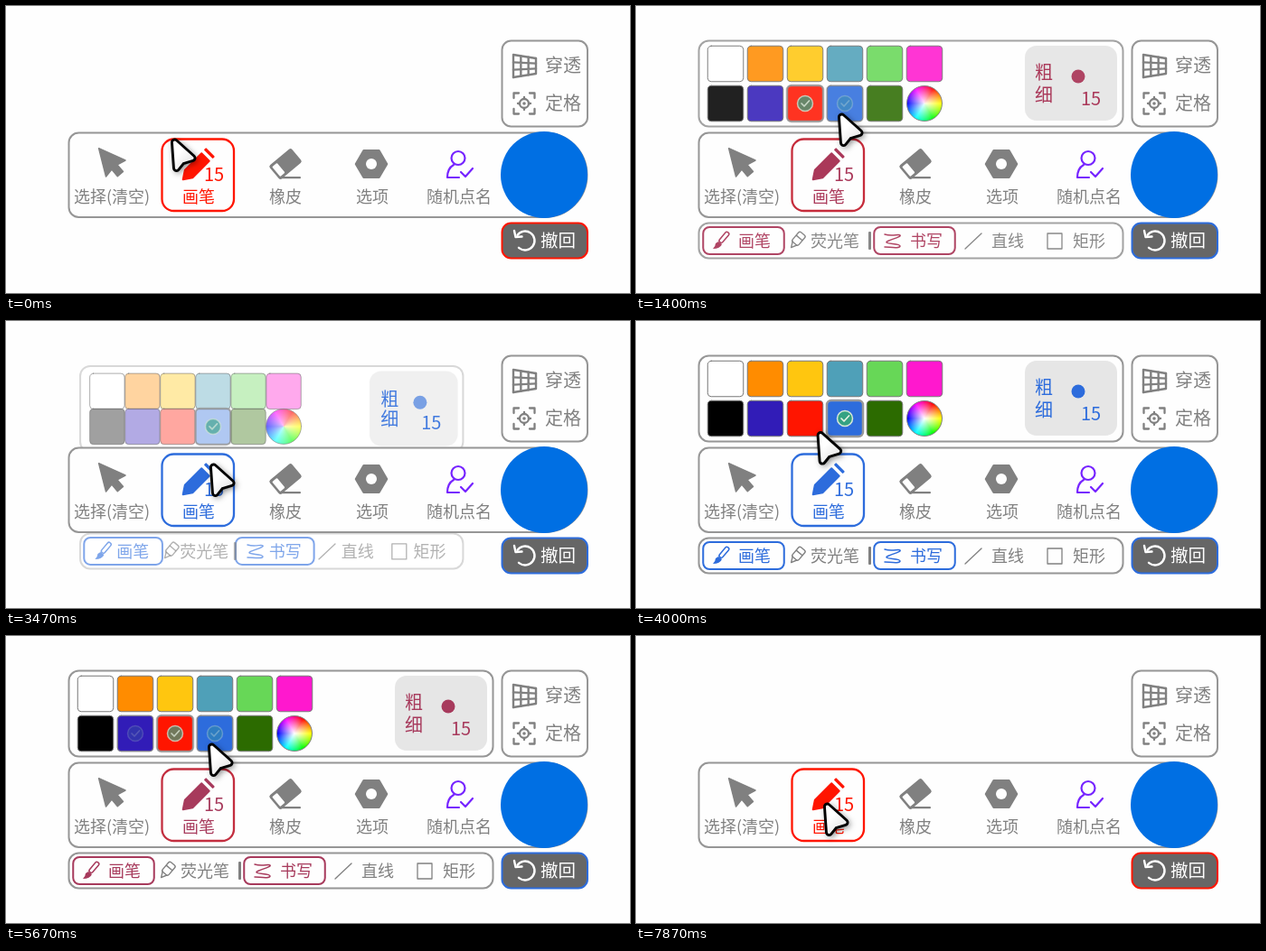
Animation of 690x318 px, one loop 9.67 s. Source, as an HTML page with a canvas:

```html
<!DOCTYPE html>
<html lang="zh-CN">
<head>
<meta charset="utf-8">
<title>画笔工具栏</title>
<style>
html, body { margin: 0; width: 100%; height: 100%; overflow: hidden; background: #fefefe; }
canvas { display: block; width: 690px; height: 318px; }
</style>
</head>
<body>
<canvas id="stage" width="690" height="318"></canvas>
<script>
const ctx = document.getElementById('stage').getContext('2d');
const LOOP = 9670, TOGGLE_MS = 420, TINT_MS = 300, GLIDE_MS = 220;
const GRAY = '#808080', LINE = '#969696', PAPER = '#fefefe';
const FONT = '"Noto Sans CJK SC", "Noto Sans CJK", "Noto Sans", sans-serif';

// Places the pointer visits; some pick a colour, the pen button toggles the panel
const RED = { x: 187, y: 104, rgb: [255, 21, 0] };
const BLUE = { x: 223, y: 118, rgb: [45, 108, 220] };
const PURPLE = { x: 149, y: 104, rgb: [49, 28, 183] };
const PEN = { x: 207, y: 184, toggles: true };
const START = { x: 182, y: 146 }, REST = { x: 204, y: 186 }, HOVER = { x: 225, y: 157 };

// Arrival time, place, travel time
const STEPS = [
  [0, START], [400, REST, 330], [1035, PEN], [1280, BLUE], [2300, PEN], [3315, PEN],
  [3470, HOVER], [4310, RED, 800], [4605, PURPLE], [5180, RED], [5545, BLUE],
  [6680, RED], [7190, PEN]
].map(([at, spot, travel = GLIDE_MS]) => ({ at, spot, travel }));
const PICKS = [{ at: 0, spot: RED }, ...STEPS.filter(s => s.spot.rgb)];
const TOGGLES = STEPS.filter(s => s.spot.toggles);

const SWATCHES = [
  ['#ffffff', '#ff8c00', '#ffc60f', '#4fa0b8', '#67d757', '#ff18ce'],
  ['#000000', PURPLE, RED, BLUE, '#2c6b00', null]
];

const clamp = v => Math.max(0, Math.min(1, v));
const mix = (a, b, k) => a + (b - a) * k;
const css = c => `rgb(${c.map(Math.round)})`;
const lastBefore = (list, t) => list.findLastIndex(s => s.at <= t);

function penColor(t) {
  const i = Math.max(0, lastBefore(PICKS, t));
  const to = PICKS[i].spot.rgb, from = PICKS[Math.max(0, i - 1)].spot.rgb;
  return css(to.map((v, n) => mix(from[n], v, clamp((t - PICKS[i].at) / TINT_MS))));
}

function checkLevel(spot, t) {
  let level = spot === RED ? 1 : 0;
  PICKS.forEach((pick, i) => {
    const end = Math.min(t, PICKS[i + 1]?.at ?? t);
    const span = Math.max(0, end - pick.at);
    level = clamp(level + (pick.spot === spot ? span / 400 : -span / 600));
  });
  return level;
}

function panelState(t) {
  const i = lastBefore(TOGGLES, t);
  if (i < 0) return { geo: 0, alpha: 0 };
  const u = clamp((t - TOGGLES[i].at) / TOGGLE_MS), rest = (1 - u) ** 4.7;
  return i % 2 ? { geo: rest, alpha: 1 - u } : { geo: 1 - rest, alpha: u };
}

function pointerAt(t) {
  const i = lastBefore(STEPS, t), { at, spot } = STEPS[i], next = STEPS[i + 1];
  if (!next) return spot;
  const u = clamp(1 - (next.at - t) / Math.min(next.travel, next.at - at));
  const k = u * u * (3 - 2 * u);
  return { x: mix(spot.x, next.spot.x, k), y: mix(spot.y, next.spot.y, k) };
}

function paint(fill, stroke, width) {
  if (fill) { ctx.fillStyle = fill; ctx.fill(); }
  if (stroke) { ctx.strokeStyle = stroke; ctx.lineWidth = width; ctx.stroke(); }
}

function box(x, y, w, h, r, fill, stroke, width = 2) {
  ctx.beginPath();
  ctx.roundRect(x, y, w, h, r);
  paint(fill, stroke, width);
}

function disc(x, y, r, fill, stroke, width) {
  ctx.beginPath();
  ctx.arc(x, y, r, 0, 7);
  paint(fill, stroke, width);
}

function shape(path, fill, stroke, width = 2) {
  const p = new Path2D(path);
  if (fill) { ctx.fillStyle = fill; ctx.fill(p); }
  if (stroke) { ctx.strokeStyle = stroke; ctx.lineWidth = width; ctx.stroke(p); }
}

function label(text, x, y, size, color) {
  ctx.font = `${size}px ${FONT}`;
  ctx.fillStyle = color;
  ctx.fillText(text, x, y + size * 0.37);
}

function within(x, y, degrees, draw) {
  ctx.save();
  ctx.translate(x, y);
  ctx.rotate(degrees * Math.PI / 180);
  draw();
  ctx.restore();
}

// Panel parts fly out of the pen button; they keep most of their size.
const place = (x, y, originY, geo, draw) =>
  within(mix(213, x, geo), mix(originY, y, geo), 0, draw);

function centered(w, h, r, geo, ...style) {
  const pw = mix(Math.min(w * 0.75, 64), w, geo);
  box(-pw / 2, -h / 2, pw, h, r, ...style);
}

function colorWheel() {
  const hues = ctx.createConicGradient(-Math.PI / 3, 0, 0);
  for (let i = 0; i <= 6; i++) hues.addColorStop(i / 6, `hsl(${i * 60} 100% 50%)`);
  disc(0, 0, 19.5, hues);
  const glow = ctx.createRadialGradient(0, 0, 0, 0, 0, 19);
  glow.addColorStop(0, '#fff');
  glow.addColorStop(1, 'rgba(255,255,255,0)');
  disc(0, 0, 19.5, glow, GRAY, 1);
}

function swatch(color, geo, alpha, ink, t) {
  if (color) {
    ctx.globalAlpha = alpha;
    centered(39.5, 39.5, 4, geo, color.rgb ? css(color.rgb) : color);
  }
  ctx.globalAlpha = ink;
  if (!color) return colorWheel();
  centered(39.5, 39.5, 4, geo, null, '#777', 1);
  const level = color.rgb ? checkLevel(color, t) : 0;
  if (!level) return;
  ctx.globalAlpha = ink * level;
  centered(40, 40, 5, geo, null, '#999', 2.5);
  disc(0, 0, 8.5, '#35a282', '#d8e8d8', 1.5);
  shape('M-4 0L-1 3L4.5-3', null, '#e8f2e4', 1.7);
}

function drawPalette(t, pen, { geo, alpha }) {
  const put = (x, y, draw) => place(x, y, 187, geo, draw);
  const ink = Math.sqrt(alpha);
  ctx.globalAlpha = alpha;
  put(304, 86, () => centered(469, 95, 11, geo, PAPER, LINE));
  SWATCHES.forEach((row, j) => row.forEach((color, i) =>
    put(99 + 44 * i, 64 + 44 * j, () => swatch(color, geo, alpha, ink, t))));
  ctx.globalAlpha = ink;
  put(481, 85.5, () => centered(102, 83, 13, geo, '#e6e6e6'));
  put(489, 78, () => disc(0, 0, 7.5, pen));
  ctx.globalAlpha = Math.min(1, alpha * 2.4);
  put(451, 74, () => label('粗', 0, 0, 20, pen));
  put(451, 99, () => label('细', 0, 0, 20, pen));
  put(503, 103, () => label('15', 0, 0, 20, pen));
}

function drawModes(pen, { geo, alpha }) {
  const put = (x, draw) => place(x, 260, 215, geo, draw);
  ctx.globalAlpha = alpha;
  put(304, () => centered(469, 39, 11, geo, PAPER, LINE));
  ctx.globalAlpha = Math.sqrt(alpha);
  for (const x of [119, 308]) put(x, () => centered(89.5, 30, 7, geo, null, pen));
  put(94, () => {
    within(0, 0, -50, () => box(-2, -2, 14, 4.5, 2, null, pen, 1.5));
    shape('M-3 1L1 4Q-1 9-9 9Q-6 6-6 3Z', pen);
  });
  put(178, () => within(0, 0, -50, () => {
    box(-4, -4.5, 14, 9, 2, null, GRAY, 1.4);
    shape('M-4-3L-10 0L-4 3M4-4V4', null, GRAY, 1.4);
  }));
  put(258.5, () => box(-1.5, -10, 3, 20, 1, GRAY));
  put(284, () => shape('M-9-7C0-4 6-8 8-6S-8 0-7 2S8 3 8 6S-4 7-9 7', null, pen, 1.5));
  put(373, () => shape('M-9 9L9-8', null, GRAY, 1.3));
  put(463, () => box(-8, -8, 16, 17, 0, null, GRAY, 1.3));
  const names = [['画笔', 131, pen], ['荧光笔', 220, GRAY], ['书写', 321, pen],
    ['直线', 411, GRAY], ['矩形', 501, GRAY]];
  for (const [text, x, color] of names) put(x, () => label(text, 0, 0, 18, color));
}

function hexagon(r) {
  ctx.beginPath();
  for (let i = 0; i < 6; i++) ctx.lineTo(r * Math.cos(i * Math.PI / 3), r * Math.sin(i * Math.PI / 3));
  ctx.closePath();
  paint(GRAY, GRAY, 2.5);
}

function drawToolbar(pen, edge) {
  box(69.5, 140.5, 573, 93.5, [11, 47, 47, 11], PAPER, LINE);
  disc(595, 187, 48, '#006fe3');

  within(102, 157, -40, () => shape('M0 1L14 30L4 28V38H-4V28L-14 30Z', GRAY, GRAY, 1.5));
  within(195, 193, -45, () => {
    shape('M1 0L10-6H36V6H10Z', pen, pen, 2);
    box(40.5, -7, 3.5, 14, 1, pen);
  });
  label('15', 230, 187, 20, pen);
  box(172.5, 147.5, 79.5, 79.5, 13, null, edge, 2.3);

  within(309, 175, -40, () => {
    box(-16, -10, 32, 20, 2.5, GRAY);
    box(-13.5, -7, 7, 14, 1, PAPER);
  });
  box(303, 189, 23, 2.2, 1, GRAY);

  within(404, 175, 0, () => hexagon(17));
  disc(404, 175, 6, PAPER);

  const violet = '#7624ff';
  disc(500, 168.5, 7.5, null, violet, 2.2);
  shape('M495 176Q488 180 488 190H501M503 184L508 189L516 180', null, violet, 2.2);

  const names = ['选择(清空)', '画笔', '橡皮', '选项', '随机点名'];
  names.forEach((text, i) => label(text, 117 + 96 * i, 211, 18, i === 1 ? pen : GRAY));
}

function drawSide(undoEdge) {
  box(548.5, 38.5, 94.5, 95, 10, PAPER, LINE);
  for (let i = 0; i <= 3; i++) {
    const k = i / 3, x = 561 + 25 * k;
    shape(`M${x} ${54 + 4 * k}V${79 - 4 * k}M561 ${54 + 25 * k}L586 ${58 + 17 * k}`, null, GRAY, 2.4);
  }
  for (let turn = 0; turn < 360; turn += 90) {
    within(573, 108, turn, () => shape('M6-11.5H11.5V-6M0-7V-5', null, GRAY, 2.3));
  }
  disc(573, 108, 5, null, GRAY, 2.3);
  disc(573, 108, 1.8, GRAY);
  label('穿透', 616, 66, 20, GRAY);
  label('定格', 616, 108, 20, GRAY);

  box(548.5, 240.5, 94.5, 39, 10, '#666', undoEdge);
  ctx.beginPath();
  ctx.arc(574, 260, 10.5, -2.5, 2.3);
  paint(null, '#fff', 2.4);
  shape('M562 249L563.5 256L570.5 255.5', null, '#fff', 2.4);
  label('撤回', 610.5, 260, 19.5, '#fff');
}

function drawPointer({ x, y }) {
  const body = 'M4.5 5L24 22.5L12.5 26L6.5 33.5Z';
  within(x, y, 0, () => {
    ctx.shadowColor = 'rgba(0,0,0,.35)';
    ctx.shadowBlur = 6;
    ctx.shadowOffsetX = ctx.shadowOffsetY = 2;
    shape(body, '#000', '#000', 9);
    ctx.shadowColor = 'transparent';
    const shine = ctx.createLinearGradient(4, 10, 24, 30);
    shine.addColorStop(0.3, '#fff');
    shine.addColorStop(1, '#e4e4e4');
    shape(body, shine, shine, 3.2);
  });
}

function draw(t) {
  const pen = penColor(t), panel = panelState(t);
  ctx.globalAlpha = 1;
  ctx.fillStyle = PAPER;
  ctx.fillRect(0, 0, 690, 318);
  ctx.lineJoin = ctx.lineCap = 'round';
  ctx.textAlign = 'center';

  if (panel.alpha > 0) {
    drawPalette(t, pen, panel);
    drawModes(pen, panel);
    ctx.globalAlpha = 1;
  }
  drawToolbar(pen, penColor(t - 40));
  drawSide(css(PICKS[lastBefore(PICKS, t)].spot.rgb));
  drawPointer(pointerAt(t));
}

const start = performance.now();
function tick() {
  draw(Math.max(0, performance.now() - start) % LOOP);
  requestAnimationFrame(tick);
}
tick();
</script>
</body>
</html>
```
